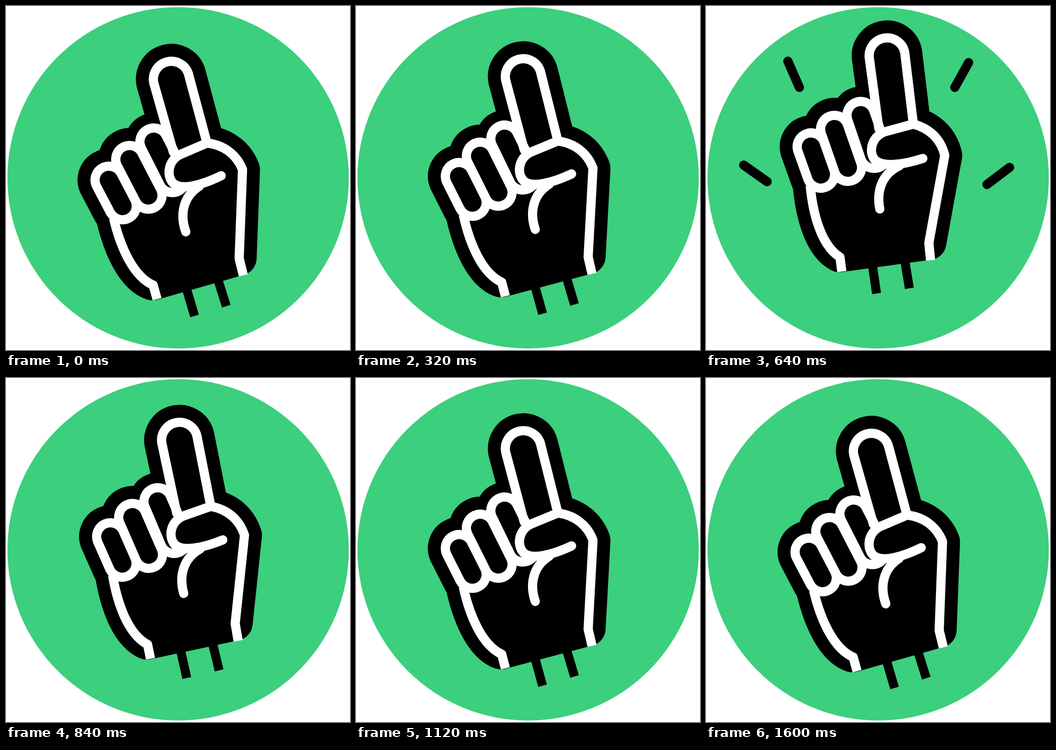
Recreate the animation shown at these times as an HTML page. Size 748 by 748 pixels, loop 3000 ms.

```html
<!DOCTYPE html>
<html>
<head>
<meta charset="utf-8">
<style>
  html, body { margin: 0; height: 100%; overflow: hidden; background: #fff; }
  svg { display: block; width: 100%; height: 100%; }
</style>
</head>
<body>
<svg viewBox="0 0 748 748" fill="none" stroke-linejoin="round">
  <defs>
    <path id="ring" stroke-linecap="round" d="M366 317L347.1 280.2A30 30 0 0 0 293.9 307.8L335.4 389.8A30 30 0 0 0 383 397"/>
    <g id="fingers" stroke-linecap="round">
      <path d="M241.4 345.8A30 30 0 0 1 294.6 318.2L336.6 399.2A30 30 0 0 1 283.4 426.8Z"/>
      <path d="M196.4 390.8A30 30 0 0 1 249.6 363.2L280.6 422.2A30 30 0 0 1 227.4 449.8Z"/>
      <path d="M364 318L321.4 167.7A39 39 0 0 1 396.6 147.3L437 298"/>
    </g>
  </defs>
  <circle cx="374.3" cy="373.6" r="371.2" fill="#3ccf7d"/>
  <path id="rays" stroke="#000" stroke-width="20" stroke-linecap="round"/>
  <g id="hand">
    <path d="M389 603L410 674M458 586L479 652.7" stroke="#000" stroke-width="19.5"/>
    <g fill="#000" stroke="#000" stroke-width="76">
      <use href="#ring" stroke-width="65"/>
      <use href="#fingers"/>
      <path d="M437 298C473 302 501 322 514.3 355.7L507 548L318 602C277 588 249 525 234 462Z"/>
    </g>
    <g stroke="#fff" stroke-width="20">
      <use href="#ring"/>
      <use href="#fingers"/>
      <path d="M437 298C473 302 501 322 514.3 355.7L507 549L516 585.7"/>
      <path d="M234 462C249 525 277 588 320 607L328.5 637.5"/>
      <g stroke-linecap="round">
        <path d="M437 298L381 322C353 334 347 368 364 386C382 401 425 390 468 369"/>
        <path d="M391 491C378 455 384 415 420 392"/>
      </g>
    </g>
  </g>
</svg>
<script>
const LOOP = 3000, ACTIVE = 1600, BEAT = 400, STEP = 40;
const hand = document.getElementById('hand');
const rays = document.getElementById('rays');
// start x, start y, direction x, direction y
const RAYS = [[203, 177, -25, -57], [541, 177, 30, -54], [133, 382, -51, -36], [611, 388, 49, -37]];

const ease = u => 1 - (1 - u ** 1.48) ** 4;

function draw(time) {
  const t = Math.min(Math.floor(time % LOOP / STEP) * STEP, ACTIVE);
  const phase = t % BEAT, half = BEAT / 2;
  const rising = phase <= half;
  const p = rising ? ease(phase / half) : 1 - ease(phase / half - 1);
  // the way down bows away from the way up
  const bow = p * (1 - p);
  const x = 10.5 * (p - (rising ? 0 : 2.2 * p * bow));
  const y = -66 * (p + (rising ? 0.15 : 0.63 * p) * bow);
  hand.setAttribute('transform', `translate(${x} ${y}) rotate(${12 * p} 374 374)`);

  const k = 1.5 - Math.abs(phase - half) / 80;
  rays.setAttribute('d', k > 0.001
    ? RAYS.map(([a, b, dx, dy]) => `M${a} ${b}l${dx * k} ${dy * k}`).join('')
    : '');
}

const start = performance.now();
function tick() {
  draw(performance.now() - start);
  requestAnimationFrame(tick);
}
tick();
</script>
</body>
</html>
```
